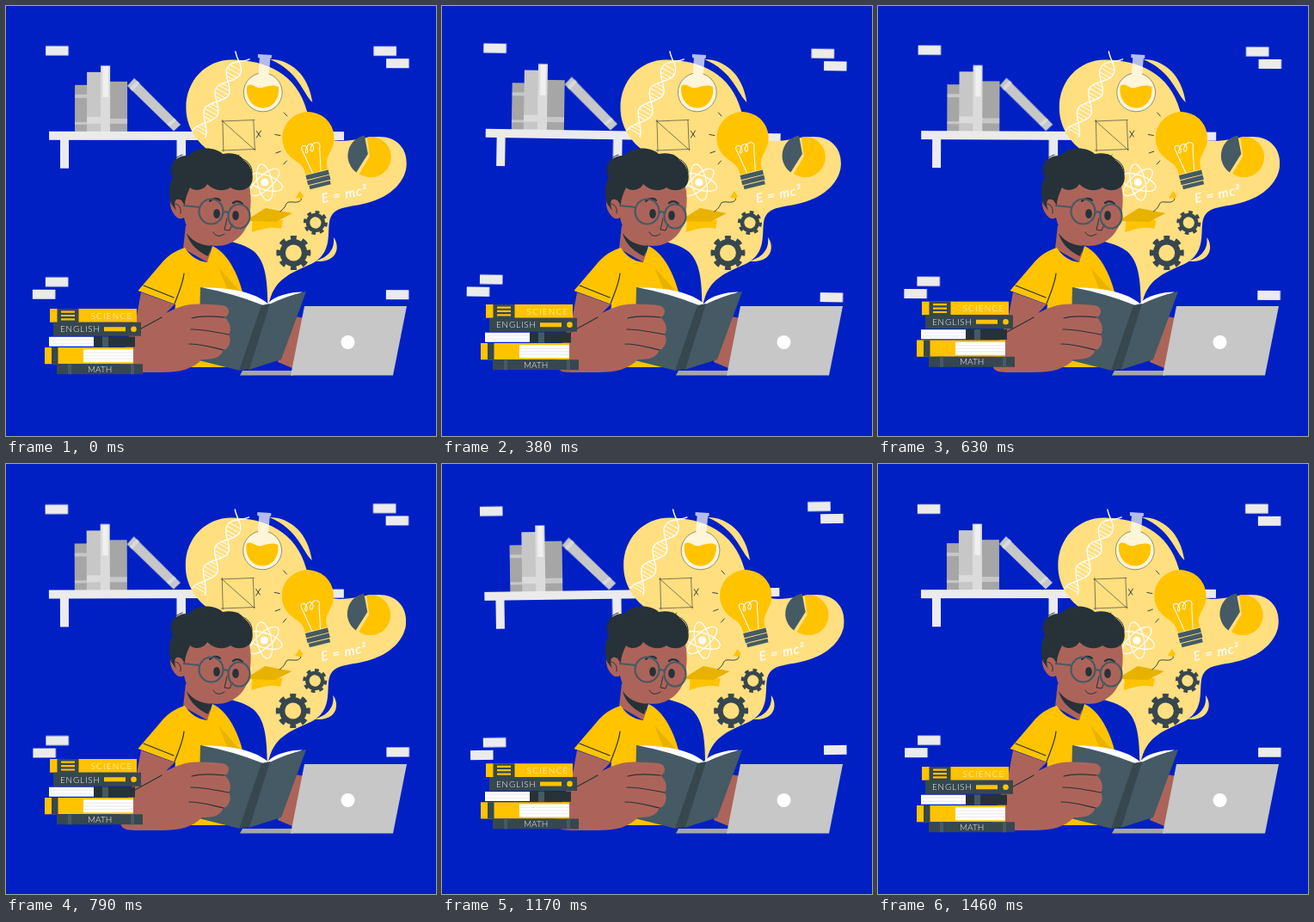
Write an HTML page without scripts that moves like this. It is 500 by 500 pixels and loops after 1.5 s.

```html
<!DOCTYPE html>
<html lang="en">
<head>
<meta charset="utf-8">
<title>Reading and ideas</title>
<style>
  html, body { margin: 0; height: 100%; overflow: hidden; background: #0020c4; }
  svg { display: block; width: 100vw; height: 100vh; }
  .wall, .idea, .stack { animation: 1.5s linear -20ms infinite; }
  .wall { animation-name: sway; transform-origin: 250px 194px; }
  .idea { animation-name: shake; }
  .stack { animation-name: float; }
  @keyframes sway { 25% { transform: rotate(1deg); } 75% { transform: rotate(-1deg); } }
  @keyframes shake {
    10%, 90% { transform: translateX(-1px); }
    20%, 80% { transform: translateX(2px); }
    30%, 50%, 70% { transform: translateX(-4px); }
    40%, 60% { transform: translateX(4px); }
  }
  @keyframes float { 50% { transform: translateY(-10px); } }
  .yellow { fill: #ffc300; }
  .amber { fill: #e8b200; }
  .slate { fill: #455a64; }
  .deep { fill: #37474f; }
  .ink { fill: #263238; }
  .skin { fill: #ac645a; }
  .white { fill: #fff; }
  .pale { fill: #ebebeb; }
  .light { fill: #dbdbdb; }
  .mid { fill: #c7c7c7; }
  .grey { fill: #a6a6a6; }
  .line { fill: none; stroke: #263238; stroke-linecap: round; stroke-linejoin: round; }
  .chalk { fill: none; stroke: #fff; stroke-linecap: round; stroke-linejoin: round; }
  text { font-family: Lato, sans-serif; fill: #fff; }
  .spine { font-size: 10px; font-weight: 300; }
</style>
</head>
<body>
<svg viewBox="0 0 500 500">
  <defs>
    <rect id="brick" width="26.500" height="11"/>
    <ellipse id="orbit" rx="21.500" ry="8.500"/>
    <g id="gear" fill="none" stroke="#37474f">
      <circle r="12.700" stroke-width="6.500"/>
      <circle r="17" stroke-width="6" pathLength="16" stroke-dasharray="1" stroke-dashoffset=".5"/>
    </g>
    <path id="strand" d="M-3-9C8-9 17 9 28 9S46-9 57-9S75 9 86 9S100-3 109-10"/>
  </defs>

  <g class="wall">
    <g class="pale">
      <use href="#brick" x="46" y="46.700"/>
      <use href="#brick" x="427.300" y="46.700"/>
      <use href="#brick" x="442" y="61"/>
      <use href="#brick" x="46" y="315.600"/>
      <use href="#brick" x="31" y="330"/>
      <use href="#brick" x="442" y="330"/>
      <path d="M50 146H393V156H209V189H198.500V156H73V189H63V156H50Z"/>
    </g>
    <path class="grey" d="M80 92H94V146H80ZM121 88H141V146H121Z"/>
    <path class="mid" d="M94 77H110V146H94ZM80 103H94V107H80ZM80 135H94V138H80ZM121 131H141V137H121ZM141 93L149 84L203 138L195 145.500Z"/>
    <path class="light" d="M94 129H110V137H94ZM110 69.500H121V146H110ZM144 96L152.500 87L155.500 90L147 99ZM187 137.500L195.500 130.500L198 133L190 140Z"/>
    <path fill="#f0f0f0" d="M112.500 70H119V106H112.500Z"/>
  </g>

  <g class="idea">
    <g fill="#ffdf80">
      <path d="M304.500 348C304 318 302 297 288 285C276 276 262 275 250 270L240 171C222 159 209.500 141 209.500 118C209.500 87 232 62.500 263 62.500C302 63 338 78 350 122C357 143 368 157 389 157C404 157 418 152 434 152C454 152 466 165 466 183C466 203 448 222 420 229C397 235 379 232 376 252C374 267 379 288 355 300C330 311 311 318 305.500 348Z"/>
      <path d="M307 62C331 62 352 80 356.500 112C346 103 341 76 307 62Z"/>
      <path d="M381 269C389 279 386 300 359 296.500C374 293 383 283 381 269Z"/>
    </g>

    <g class="chalk" stroke-width="1.500" transform="translate(226 146) rotate(-61) scale(.93)">
      <use href="#strand"/>
      <use href="#strand" transform="scale(1 -1)"/>
      <path stroke-width="1" d="M0-8V8M4-7V7M8-4V4M19-4V4M23-7V7M28-8V8M33-7V7M37-4V4M48-4V4M52-7V7M57-8V8M62-7V7M66-4V4M77-4V4M81-7V7M86-8V8M91-6V6"/>
    </g>

    <path class="white" opacity=".7" d="M293 56L309 57V60.500L307.500 61L306 79A22.500 22.500 0 1 1 293.500 78.500L295 60.500L293 60Z"/>
    <path class="yellow" d="M280.500 93C287 88 290 97 298 95C306 93 310 91 317 94C319 108 310 118.500 299 118.500C287 118.500 278 107 280.500 93Z"/>
    <path class="line" stroke-width=".5" d="M293.500 78.500A22.500 22.500 0 1 0 306 79"/>

    <path class="line" stroke-width=".6" d="M251 134L289 132.500M252 132.500L253 169M288 133L289.500 168M251 168L290 166.500M252 134L288 166"/>
    <path class="line" stroke-width=".9" d="M291.500 145.500L296 152M296.500 145L291.500 153M267 173L271 179M271 173L266 180"/>

    <g class="chalk" stroke-width="1.200" transform="translate(301 205)">
      <use href="#orbit" transform="rotate(18)"/>
      <use href="#orbit" transform="rotate(78)"/>
      <use href="#orbit" transform="rotate(138)"/>
      <circle r="4" fill="#fff"/>
    </g>

    <path class="line" stroke-width=".9" d="M323.500 124L327 128M313 149.500L319 150.500M314 171L319.500 169M323 184L326.500 180"/>
    <g transform="translate(351.500 153) rotate(-14)">
      <path class="yellow" d="M-13 41C-13 31-16 28-22 21A30.200 30.200 0 1 1 22 21C16 28 13 31 13 41Z"/>
      <path class="chalk" stroke-width="1" d="M-5 41L-10 14C-13 7-5 5-4 12C-4 19-9 18-6 13C-2 5 5 7 3 14C1 19-3 16 1 11C6 5 14 8 10 15L5 41"/>
      <path class="slate" d="M-13.500 42H13.500V47.300H-13.500ZM-13.500 48.300H13.500V53.600H-13.500ZM-12.500 54.600H12.500V59H-12.500Z"/>
    </g>

    <path class="yellow" d="M423 175L420 152.500A23.500 23.500 0 1 1 411 195Z"/>
    <path class="slate" d="M421 172L417 150.500A24 24 0 0 0 407.500 193.500Z"/>
    <text transform="translate(368 229) rotate(-11)" font-size="15" font-style="italic" font-weight="400" letter-spacing="1" stroke="#fff" stroke-width=".3">E = mc²</text>

    <path class="yellow" d="M287 248L322 249L320 259C309 256 299 259 286 263Z"/>
    <path class="amber" d="M278 250L302 235L333 241L314 251Z"/>
    <path class="line" stroke-width=".9" d="M319 239C330 231 322 227 334 228C342 229 346 225 342 221"/>
    <path class="yellow" d="M342 215L346 221L344 224L337 223Z"/>

    <use href="#gear" transform="translate(334.500 287)"/>
    <use href="#gear" transform="translate(360 252) rotate(10) scale(.7)"/>
  </g>

  <!-- reader -->
  <path class="skin" d="M331 360L347 363L333 421L316 414Z"/>
  <path class="skin" d="M209 255L238 270L236 299L206 282Z"/>
  <path class="ink" d="M210 264C217 274 227 278 239 279L235 291C224 286 213 277 210 264Z"/>
  <path class="yellow" d="M208 281C196 285 188 290 180 300L153.500 331L197 347L190 420H260L276 336C270 312 258 287 240 279L234 298C223 297 213 290 208 281Z"/>
  <path class="amber" d="M247 304L274 334L258 331Z"/>
  <path class="line" stroke-width="1.200" d="M207 311C206 322 201 333 196 346M160 325L195 339"/>

  <path class="skin" d="M207 205L203 225C191 217 188 229 194 240C198 247 203 249 207 246C211 267 229 279 245 279C264 279 278 266 282 250C285 236 286 218 282 206Z"/>
  <path class="ink" d="M204 226C195 221 195 231 198 238L192 230C188 217 190 205 194 199C189 185 197 173 212 174C222 162 244 164 252 172C266 169 275 175 276 179C287 185 290 203 283 210C277 215 268 216 261 211C252 217 241 214 234 207C229 216 218 215 214 211C211 218 208 224 208 232Z"/>
  <path class="line" stroke-width="1" d="M191 197C190 184 195 176 205 173M270 177C280 177 287 186 286 195M197 230C202 231 204 236 203 241M257 247L254 260L260 261L263 254M241 263C244 269 250 268 254 265"/>
  <path class="line" stroke-width="2.200" d="M237 227C241 223 246 223 249 226M264 229C268 226 272 227 275 230"/>
  <ellipse class="ink" cx="245" cy="241.500" rx="3.800" ry="5.500"/>
  <ellipse class="ink" cx="267" cy="243.500" rx="3.800" ry="5.500"/>
  <g fill="none" stroke="#455a64" stroke-width="2.200">
    <ellipse cx="238.500" cy="239" rx="14" ry="14.500"/>
    <ellipse cx="271" cy="244.500" rx="12.500" ry="14"/>
    <path d="M206 232L225 234M252 241C255 238 257 239 259 242"/>
  </g>

  <!-- open book -->
  <path class="white" d="M229 327.500C260 327 290 333 304.500 346C312 337 330 332.500 345 332.500L306 350H297Z"/>
  <path class="slate" d="M226 327Q264 334 299 348L272 424L224 412ZM306 347Q326 337 349 332L320 411L282 423Z"/>
  <path class="deep" d="M297 348L307 346L283 422L271 424Z"/>

  <path class="skin" d="M157 333L196 347L186 357C200 350 211 346 225 346.500C240 347 248 347 255 349C261 352 260 360 254 362C260 367 263 375 259 382C263 389 259 398 253 400C249 409 241 411 228 411C217 422 203 426 180 426H150C138 426 131 424 133 410L152 360Z"/>
  <path class="line" stroke-width="1.200" d="M150 379L181 362M216 363C230 359 243 361 254 362M215 376C232 376 247 380 259 382M213 393C229 393 243 398 253 400"/>

  <path class="grey" d="M275 424H334V429.500H272Z"/>
  <path class="mid" d="M347 349H466L450 429.500H331Z"/>
  <circle class="white" cx="397.500" cy="391" r="8"/>

  <g class="stack">
    <path class="yellow" d="M51 352.300H152V368H51ZM45 397.300H148V416.500H45Z"/>
    <path class="deep" d="M59.500 352.300H84.500V368H59.500ZM55 368H157V384H55ZM53 397.300H60.500V416.500H53ZM59 416.500H159V428.500H59Z"/>
    <path class="ink" d="M102 384.800H150V396.800H102Z"/>
    <path class="slate" d="M112 384.800H119V396.800H112ZM72 416.500H76V428.500H72ZM145 416.500H149V428.500H145Z"/>
    <path class="yellow" d="M64 354.800H80V357H64ZM64 359.200H80V361.400H64ZM64 363.600H80V365.800H64ZM114 373.500H139V378.500H114Z"/>
    <circle class="yellow" cx="148.500" cy="376" r="3.300"/>
    <path class="white" d="M50 385H102V396H50ZM90 399.500H148V414.500H90Z"/>
    <path stroke="#dbdbdb" stroke-width=".6" d="M52 388.500H102M52 392.500H102M91 403.500H148M91 407H148M91 410.500H148"/>
    <g class="spine">
      <text x="98.500" y="364" letter-spacing="1.200">SCIENCE</text>
      <text x="63" y="379.700" letter-spacing=".8">ENGLISH</text>
      <text x="95" y="426">MATH</text>
    </g>
  </g>
</svg>
</body>
</html>
```
